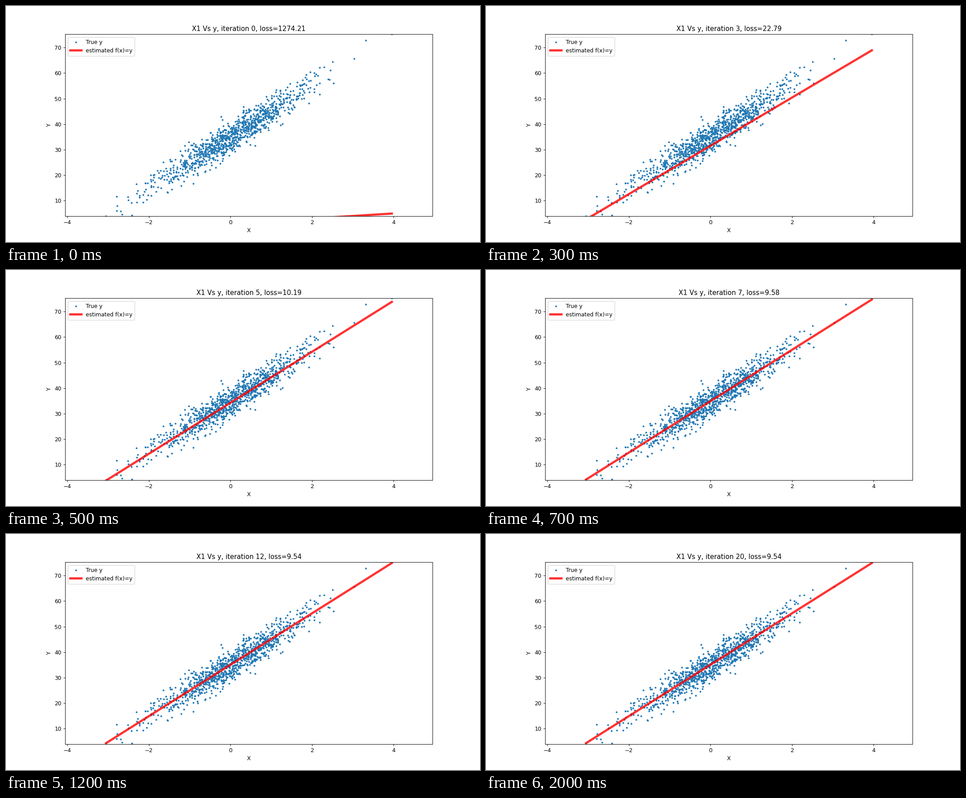
These frames come from a looping animation (1058 by 529 pixels, 2.1 s). A matplotlib script:

```python
import numpy as np
import matplotlib.pyplot as plt
from matplotlib.animation import FuncAnimation

WIDTH, HEIGHT = 1058, 529
STEPS = 21
RATE = 0.524

# Noisy linear data
rng = np.random.RandomState(1)
x = rng.randn(1000)
y = 35 + 10 * x + 3 * rng.randn(1000)


def descend(steps):
    """Return the weights (bias, slope) at every gradient descent step."""
    features = np.column_stack([np.ones_like(x), x])
    weights = np.ones(2)
    path = [weights]
    for _ in range(steps - 1):
        error = features @ weights - y
        weights = weights - RATE * features.T @ error / len(x)
        path.append(weights)
    return path


path = descend(STEPS)
ends = np.array([x.min(), x.max()])

fig, ax = plt.subplots(figsize=(12, 6), dpi=WIDTH / 12)
ax.scatter(x, y, s=5, label="True y")
line, = ax.plot([], [], color="red", lw=4, alpha=0.8, label="estimated f(x)=y")
ax.set_xlim(x.min() - 1, x.max() + 1)
ax.set_ylim(y.min(), y.max())
ax.set_xlabel("X")
ax.set_ylabel("Y")
ax.legend(loc="upper left")
title = ax.set_title("")


def update(step):
    bias, slope = path[step]
    loss = np.mean((bias + slope * x - y) ** 2)
    line.set_data(ends, bias + slope * ends)
    title.set_text(f"X1 Vs y, iteration {step}, loss={loss:.2f}")
    return line, title


anim = FuncAnimation(fig, update, frames=STEPS, init_func=lambda: update(0),
                     interval=100, repeat=True, repeat_delay=0)
plt.show()
```
